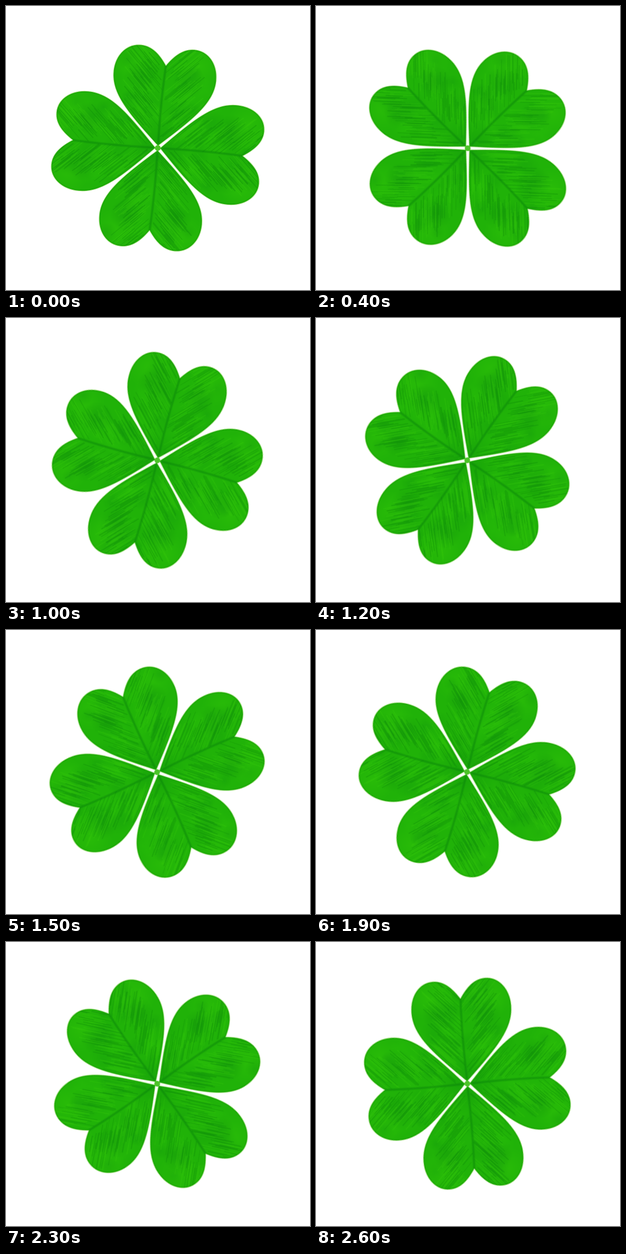
An HTML page with a canvas for the animation above (2700 ms loop, 526 by 492 pixels).

```html
<!DOCTYPE html>
<html lang="en">
<head>
<meta charset="utf-8">
<title>Turning clover</title>
<style>
  html, body { margin: 0; width: 100%; height: 100%; overflow: hidden; background: #fff; }
  #stage { position: relative; width: 100%; height: 100%; overflow: clip; }
  #clover { position: absolute; left: 62px; top: 46px; width: 400px; height: 400px; }
</style>
</head>
<body>
<div id="stage"><canvas id="clover" width="800" height="800"></canvas></div>
<script>
const clover = document.getElementById('clover');
const ctx = clover.getContext('2d');
const TILT = 5.5 * Math.PI / 180;
const NOTCH = -145;

let seed = 7;
function rand() {
  seed = (seed * 16807) % 2147483647;
  return seed / 2147483647;
}
const between = (a, b) => a + (b - a) * rand();

// A heart standing on its tip: one half, mirrored by side = -1 or 1.
function halfHeart(path, side) {
  path.moveTo(0, NOTCH);
  path.bezierCurveTo(side * 12, -163, side * 26, -177.5, side * 46, -177.5);
  path.bezierCurveTo(side * 70, -177.5, side * 87.5, -156, side * 87.5, -127);
  path.bezierCurveTo(side * 87.5, -88, side * 55, -56, 0, -4.5);
}

function heart() {
  const path = new Path2D();
  halfHeart(path, -1);
  halfHeart(path, 1);
  return path;
}

function outline(path, color, width) {
  ctx.strokeStyle = color;
  ctx.lineWidth = width;
  ctx.stroke(path);
}

function blotch(x, y, r, rgb, alpha) {
  const g = ctx.createRadialGradient(x, y, 0, x, y, r);
  g.addColorStop(0, `rgba(${rgb},${alpha})`);
  g.addColorStop(1, `rgba(${rgb},0)`);
  ctx.fillStyle = g;
  ctx.fillRect(x - r, y - r, 2 * r, 2 * r);
}

// Fine streaks from the midrib out to the rim.
function veins(side) {
  for (let y = -6; y > -165; y -= 2) {
    const start = between(0, 45);
    const end = start + between(25, 65);
    ctx.strokeStyle = rand() < .5 ? 'rgba(6,120,8,.26)' : 'rgba(60,205,14,.26)';
    ctx.lineWidth = between(.8, 2);
    ctx.beginPath();
    ctx.moveTo(side * start * .7, y - start * .72);
    ctx.lineTo(side * end * .7, y - end * .72);
    ctx.stroke();
  }
}

function leaf() {
  const path = heart();
  outline(path, 'rgba(125,210,60,.5)', 2);
  ctx.fillStyle = '#20b208';
  ctx.fill(path);

  ctx.save();
  ctx.clip(path);
  for (const side of [-1, 1]) {
    blotch(side * 58, -150, 40, '52,200,8', .4);
    blotch(side * 42, -122, 28, '8,128,14', .3);
    for (let i = 0; i < 8; i++) {
      blotch(side * between(5, 80), between(-165, -50), between(12, 26),
        i % 2 ? '10,138,14' : '46,200,8', .22);
    }
    veins(side);
  }
  blotch(0, -15, 38, '10,140,12', .3);

  const rib = new Path2D();
  rib.moveTo(0, -8);
  rib.quadraticCurveTo(-3, -80, 0, NOTCH);
  outline(rib, 'rgba(8,125,10,.22)', 5);
  outline(rib, 'rgba(8,125,10,.3)', 2);
  outline(path, 'rgba(24,155,8,.4)', 4);
  ctx.restore();
}

ctx.scale(2, 2);
ctx.translate(200.6, 200);
ctx.scale(1.015, .985);
ctx.rotate(TILT);
for (let i = 0; i < 4; i++) {
  leaf();
  ctx.rotate(Math.PI / 2);
}

// Joint at the centre
ctx.fillStyle = '#4cc428';
ctx.beginPath();
ctx.arc(0, 0, 5, 0, 2 * Math.PI);
ctx.fill();

clover.animate(
  [{ transform: 'rotate(0deg)' }, { transform: 'rotate(270deg)' }],
  { duration: 2700, iterations: Infinity, easing: 'steps(27, end)' });
</script>
</body>
</html>
```
